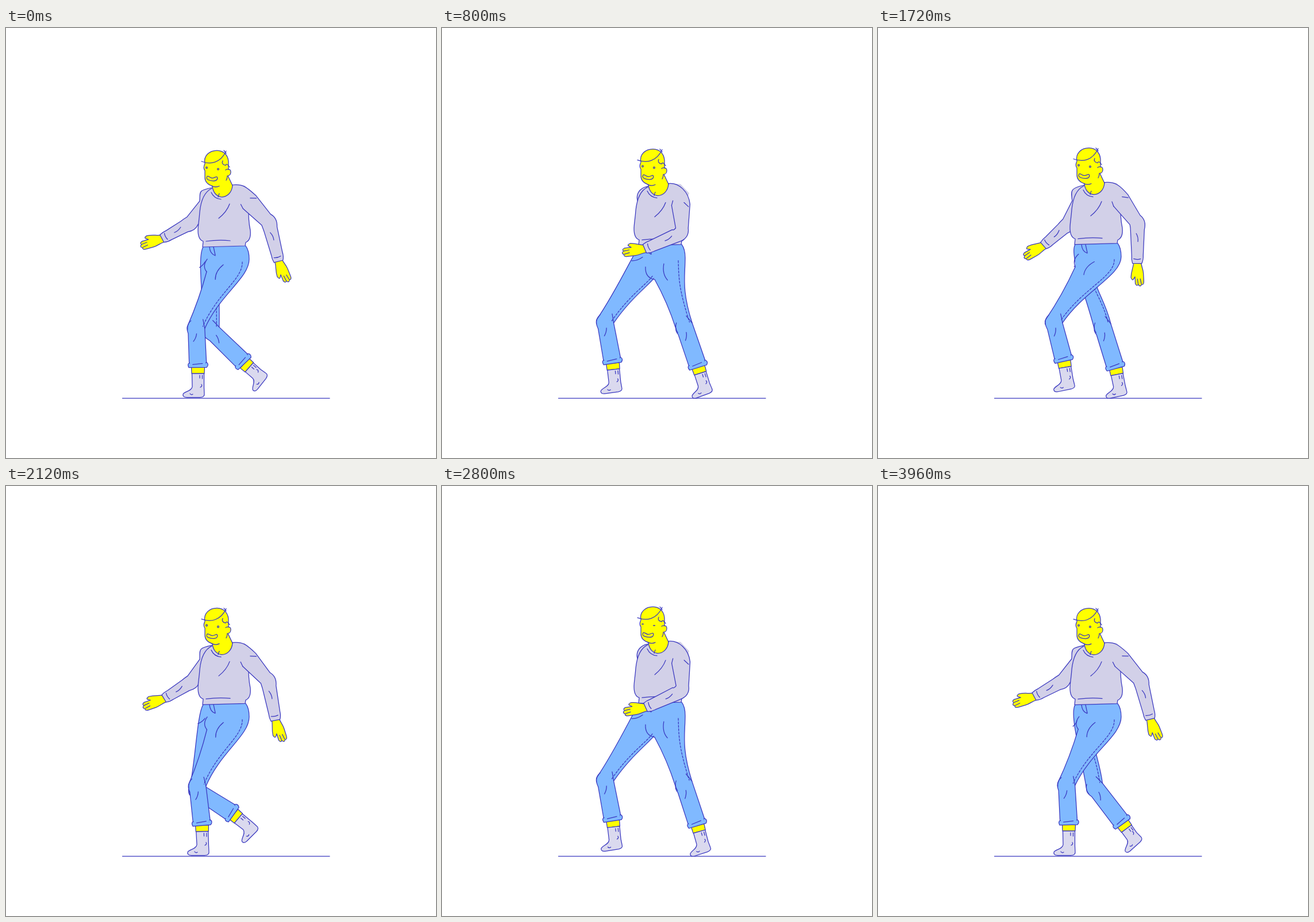
Animation of 748x748 px, one loop 4000 ms. Source, as an HTML page with a canvas:

```html
<!DOCTYPE html>
<html lang="en">
<head>
<meta charset="utf-8">
<title>Walk cycle</title>
<style>
  html, body { margin: 0; width: 100%; height: 100%; overflow: hidden; background: #fff; }
  canvas { display: block; width: 748px; height: 748px; }
</style>
</head>
<body>
<canvas id="stage" width="748" height="748"></canvas>
<script>
const ctx = document.getElementById('stage').getContext('2d');
const LOOP = 4000, STEP = 40, CYCLE = 2020;
const INK = '#3a38c0', SKIN = '#ffff00', SHIRT = '#d2d0e8', DENIM = '#80b9ff', SOCK = '#dad9ee';

// One stride of the near leg: phase, knee, trouser cuff, ankle, foot pitch in degrees.
const STRIDE = [
  [0,    331, 520, 334, 590, 334, 630, 0],
  [100,  333, 520, 341, 590, 342, 630, 0],
  [350,  350, 524, 373, 598, 380, 630, 0],
  [560,  384, 521, 408, 595, 414, 630, 3],
  [800,  421, 518, 446, 590, 457, 625, 20],
  [905,  404, 522, 449, 588, 467, 615, 38],
  [1010, 379, 526, 437, 583, 462, 605, 52],
  [1110, 354, 528, 418, 571, 446, 595, 45],
  [1360, 328, 519, 378, 567, 399, 598, 33],
  [1600, 307, 511, 337, 575, 349, 611, 16],
  [1810, 306, 510, 319, 583, 323, 621, 8],
  [1940, 328, 518, 332, 589, 332, 630, 0]
];
const FAR_SHIFT = 22;

const mod = (a, n) => ((a % n) + n) % n;
const sub = (a, b) => [a[0] - b[0], a[1] - b[1]];
const add = (a, b) => [a[0] + b[0], a[1] + b[1]];
const mix = (a, b, k) => [a[0] + (b[0] - a[0]) * k, a[1] + (b[1] - a[1]) * k];
const unit = v => { const l = Math.hypot(...v); return [v[0] / l, v[1] / l]; };
const swing = deg => [Math.sin(deg * Math.PI / 180), Math.cos(deg * Math.PI / 180)];
// Local axes of a limb: y runs down along u, x points backwards.
const frame = (o, u) => (x, y) => [o[0] + u[1] * x + u[0] * y, o[1] - u[0] * x + u[1] * y];

function stride(phase) {
  const n = STRIDE.length, p = mod(phase, CYCLE);
  const key = i => STRIDE[mod(i, n)];
  const time = i => key(i)[0] + Math.floor(i / n) * CYCLE;
  let i = n - 1;
  while (key(i)[0] > p) i--;
  const h = time(i + 1) - time(i), s = (p - time(i)) / h;
  const slope = (j, c) => (key(j + 1)[c] - key(j)[c]) / (time(j + 1) - time(j));
  const tangent = (j, c) => {
    const a = slope(j - 1, c), b = slope(j, c);
    return a * b <= 0 ? 0 : 2 * a * b / (a + b);
  };
  const value = c => {
    const a = key(i)[c], b = key(i + 1)[c];
    return a + (b - a) * s * s * (3 - 2 * s)
      + h * s * (1 - s) * ((1 - s) * tangent(i, c) - s * tangent(i + 1, c));
  };
  return { knee: [value(1), value(2)], cuff: [value(3), value(4)], ankle: [value(5), value(6)], pitch: value(7) };
}

const fill = (d, color) => { ctx.fillStyle = color; ctx.fill(new Path2D(d)); };
const line = (d, dash = []) => { ctx.setLineDash(dash); ctx.stroke(new Path2D(d)); ctx.setLineDash([]); };
const shape = (d, color) => { fill(d, color); line(d); };

function foot({ cuff, ankle, pitch }) {
  const s = unit(sub(ankle, cuff)), top = frame(cuff, s), f = frame(ankle, swing(pitch));
  shape(`M${top(-11.5, 0)}L${top(-11, 11)}L${top(11, 11)}L${top(11.5, 0)}Z`, SKIN);
  shape(`M${top(-10.5, 11)}L${f(-10, -6)}C${f(-11, 2)} ${f(-24, 2)} ${f(-26, 7)}Q${f(-27, 12)} ${f(-20, 12.5)}`
    + `L${f(4, 12.5)}Q${f(12, 12)} ${f(11, 6)}L${f(10.5, -4)}L${top(10.5, 11)}Z`, SOCK);
  line(`M${top(3, 14)}L${top(3, 19)}M${top(7.5, 14)}L${top(7.5, 20)}`
    + `M${f(6, -10)}Q${f(8, -7)} ${f(4, -5)}M${f(-14, 6)}Q${f(-12, 9)} ${f(-9, 7)}`);
}

function leg(pose, near, dy) {
  const { knee, cuff } = pose;
  const hip = [near ? 383 : 360, 402 + dy];
  const thigh = unit(sub(knee, hip)), shin = unit(sub(cuff, knee));
  const k = frame(knee, unit(add(thigh, shin))), s = frame(knee, shin), c = frame(cuff, shin);
  const toHip = sub(hip, knee);
  const pull = (p, amount) => [p[0] + toHip[0] * amount, p[1] + toHip[1] * amount];
  const back = k(15, 0), front = k(-15, 0);
  const spread = (knee[0] - 331) / 90;
  const crotch = [349 + 21 * spread, 424 + 16 * spread + dy];
  const waist = [343, 381 + dy];

  foot(pose);

  const lower = `L${c(15, -8)}L${c(-15, -8)}L${s(-14.5, 11)}Q${k(-17, 5)} ${front}`;
  const away = near ? '' : (knee[0] - 284) / 73 * 7;
  const rear = near
    ? `M417,${379 + dy}Q423,${387 + dy} 423,${402 + dy}C423,${435 + dy} ${pull(back, .5)} ${back}`
    : `M${372 + away},${434 + dy}C${360 + away},${450 + dy} ${pull(back, .4)} ${back}`;
  const fore = near
    ? `Q${pull(front, .38)} ${crotch}`
    : `C${pull(front, .42)} 332,${398 + dy} ${waist}`;
  const outline = rear + lower + fore;
  fill(outline + (near ? `L${waist}Z` : `L417,${379 + dy}Z`), DENIM);
  line(outline);

  const seamEnd = k(11, -3);
  if (near) {
    line(`M411,${407 + dy}C412,${437 + dy} ${pull(seamEnd, .5)} ${seamEnd}`, [3.5, 2.5]);
    const bend = frame(hip, thigh);
    line(`M${bend(-.5, 11)}Q${bend(-9, 27)} ${bend(-3, 40)}`);
    line(`M${add(crotch, [1 - 17 * spread, -22])}Q${add(crotch, [-8 - 9 * spread, -10 + 7 * spread])} ${crotch}`);
    line(`M354,${381 + dy}Q355,${393 + dy} 364,${396 + dy}M361,${381 + dy}L364,${395 + dy}`);
  } else {
    line(`M${366 + away},${434 + dy}C${354 + away},${450 + dy} ${pull(seamEnd, .4)} ${seamEnd}`, [3.5, 2.5]);
    const bend = frame([349, 401 + dy], thigh);
    line(`M${bend(0, 0)}Q${bend(-4, 11)} ${bend(-12, 16)}`);
  }

  line(`M${k(9, -15)}Q${k(12, -8)} ${back}M${k(-11, -9)}Q${k(-17, -2)} ${k(-14, 8)}`);
  line(`M${s(0, 12)}Q${s(-1, 19)} ${s(-6, 25)}`);
  shape(`M${c(-14, -8)}Q${c(-19, -7)} ${c(-16, 0)}L${c(15, 1)}Q${c(20, -4)} ${c(15, -8)}`
    + `Q${c(13, -7)} ${c(12, -4)}L${c(-11, -5)}Z`, DENIM);
  fill(`M${c(-14, -10)}L${c(14, -10)}L${c(13, -3)}L${c(-13, -2)}Z`, DENIM);
  line(`M${c(-9, -5)}L${c(8, -6)}`);
}

function hand(wrist, angle) {
  const h = frame(wrist, swing(angle));
  shape(`M${h(-6, -2)}C${h(-7, 8)} ${h(-11, 12)} ${h(-12, 24)}Q${h(-10, 31)} ${h(-7, 26)}L${h(-5, 23)}`
    + `L${h(-5, 35)}Q${h(-3, 40)} ${h(0, 37)}Q${h(3, 42)} ${h(6, 37)}Q${h(10, 38)} ${h(10, 31)}`
    + `L${h(10, 18)}C${h(10, 10)} ${h(7, 6)} ${h(7, -2)}Z`, SKIN);
  line(`M${h(0, 37)}L${h(-1, 27)}M${h(5.5, 36)}L${h(4, 27)}`);
}

function arm(shoulder, top, upperDeg, foreDeg, handDeg, near) {
  const u = swing(upperDeg), f = swing(foreDeg), size = near ? 1 : .92;
  const a = frame(shoulder, u);
  const elbow = a(0, near ? 64 : 55), b = frame(elbow, f);
  const wrist = b(0, near ? 69 : 55), w = frame(wrist, f);
  const e = frame(elbow, unit(add(u, f))), eu = frame(elbow, u);
  const reach = near ? 20 : 13;
  hand(wrist, handDeg);
  const outline = `M${top}C${add(top, [18, -2])} ${a(reach, -7)} ${a(reach, 15)}`
    + `L${eu(13 * size, -8)}Q${e(17 * size, 0)} ${b(12 * size, 10)}L${w(10.5 * size, -14)}`
    + `Q${w(11 * size, -6)} ${w(8 * size, 0)}L${w(-8 * size, 0)}Q${w(-10 * size, -6)} ${w(-9.5 * size, -13)}`
    + `L${b(-12 * size, 12)}Q${e(-14 * size, 3)} ${e(-13 * size, -3)}L${a(-12, 14)}`;
  if (near) {
    fill(outline + 'Z', SHIRT);
    line(outline);
    line(`M${a(-12, 14)}L${a(-9, 6)}M${a(10, 11)}L${a(17, 19)}`);
  } else {
    shape(outline + `C${a(-22, 0)} ${add(shoulder, [-21, -15])} ${top}`, SHIRT);
  }
  line(`M${b(-2, 17)}Q${b(2, 24)} ${b(1, 31)}M${w(-6, -8)}Q${w(0, -6)} ${w(6, -8)}`);
}

function torso() {
  const side = 'M358,279C345,285 339,300 337,320C336,335 334,343 334,352C334,363 337,369 343,371'
    + 'L342,381L416,379L417,373C424,370 426,362 425,352C422,338 422,328 422,311';
  fill(side + 'L430,290L415,274L395,273Z', SHIRT);
  line(side);
  line('M389,306Q384,320 370,331M348,371Q370,368 390,370');
}

function head(blink) {
  const face = 'M359,275C350,272 346,266 346,260L346,248C343,244 344,240 346,236'
    + 'C343,222 354,213 367,213C380,213 388,223 387,237L387,246C393,245 392,257 386,257L394,274';
  fill(face + 'C393,286 385,294 375,294C365,293 360,285 359,275Z', SKIN);
  line(face);
  line('M359,275C360,286 366,293 375,294C385,294 393,286 394,274M357,286Q362,297 374,298');
  line('M340,232C356,238 373,235 383,214M379,213L383,218');
  line('M377,231Q374,237 382,239Q384,234 389,242M382,247Q384,245 387,246M385,257Q385,262 383,265');
  line('M358,275Q365,278 371,275M371,288Q370,290 369,294');
  ctx.fillStyle = '#fff';
  shape('M350,258C346,264 356,266 361,266C367,266 369,262 367,259C365,258 363,261 359,261C355,261 353,257 350,258Z', SKIN);
  for (const [x, y] of [[349, 243], [369, 245.5]]) {
    ctx.beginPath();
    ctx.ellipse(x, y, 1.4, blink ? .3 : 1.4, 0, 0, 2 * Math.PI);
    ctx.stroke();
  }
}

function raised(dy, draw) {
  ctx.save();
  ctx.translate(0, dy);
  draw();
  ctx.restore();
}

function render(t) {
  const phase = t % CYCLE;
  const dy = 3.3 * (Math.cos(4 * Math.PI * phase / CYCLE) - 1);
  const c = Math.cos(2 * Math.PI * (phase + 30) / CYCLE);

  ctx.fillStyle = '#fff';
  ctx.fillRect(0, 0, 748, 748);
  ctx.strokeStyle = INK;
  ctx.lineWidth = 1.25;
  ctx.lineJoin = ctx.lineCap = 'round';
  line('M202.5,644H563');

  const farFore = -23 - 39 * c;
  raised(dy, () => arm([355, 298], [357, 278], -4 - 36 * c, farFore, farFore - 12, false));

  ctx.save();
  ctx.translate(-FAR_SHIFT, 0);
  const far = stride(phase + CYCLE / 2);
  ctx.restore();
  for (const part of ['knee', 'cuff', 'ankle']) far[part][0] -= FAR_SHIFT;
  leg(far, false, dy);
  leg(stride(phase), true, dy);

  const fore = -30 + 44 * c;
  raised(dy, () => {
    torso();
    arm([410, 296], [394, 273], 25 + 23 * c, fore, 1.3 * fore + 4, true);
    head(Math.abs(t - 2800) < 70);
  });
}

function tick() {
  render(Math.floor(performance.now() % LOOP / STEP) * STEP);
  requestAnimationFrame(tick);
}
tick();
</script>
</body>
</html>
```
